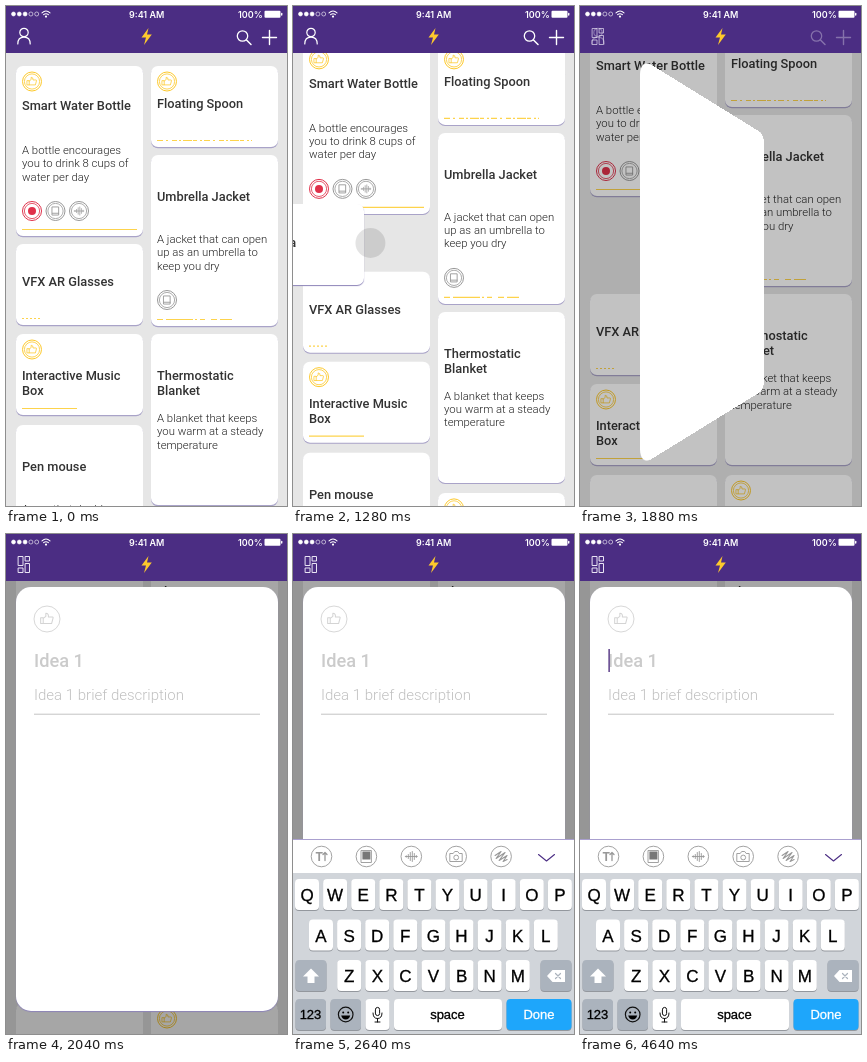
Animation of 281 by 500 pixels, one loop 4.96 s. Source, as an HTML page:

```html
<!DOCTYPE html>
<html lang="en">
<head>
<meta charset="utf-8">
<title>Idea board</title>
<style>
  html, body { margin: 0; width: 100%; height: 100%; overflow: hidden; background: #e6e6e6; }
  #stage { position: relative; width: 281px; height: 500px; overflow: hidden; }
  #stage > * { position: absolute; left: 0; top: 0; }
  svg { display: block; overflow: hidden; }
  text { font-family: Roboto, sans-serif; }
  .title { font-size: 12.8px; font-weight: 500; fill: #333; }
  .desc { font-size: 11.35px; font-weight: 300; fill: #222; }
  .status { font: 600 9px Inter, sans-serif; fill: #fff; }
  .key { font: 17px "Liberation Sans", Arial, sans-serif; fill: #000; stroke: #000; stroke-width: .3px; text-anchor: middle; }
  .small { font-size: 13px; }
  .done { fill: #fff; stroke: #fff; }
  .line { fill: none; stroke-linecap: round; stroke-linejoin: round; }
  #dim { top: 47px; width: 281px; height: 453px; background: #000; }
  #sheet { background: #fff; }
  #sheet svg { position: absolute; left: 0; }
  #front { top: 50%; margin-top: -40.5px; }
  #editor { top: 0; }
</style>
</head>
<body>
<div id="stage"></div>
<script>
const LOOP = 4960, STEP = 40;
const YELLOW = '#fdc92c', GRAY = '#989898', PURPLE = '#4b2d83';

// ---- drawing helpers ----
const svg = (id, w, h, body, extra = '') =>
  `<svg id="${id}" width="${w}" height="${h}" ${extra}>${body}</svg>`;
const at = (x, y, body, scale = 1) => `<g transform="translate(${x} ${y}) scale(${scale})">${body}</g>`;
const path = (d, color, width = 1) =>
  `<path class="line" d="${d}" stroke="${color}" stroke-width="${width}"/>`;
const ring = (r, color, width = 1) =>
  `<circle r="${r}" fill="none" stroke="${color}" stroke-width="${width}"/>`;
const rect = (x, y, w, h, r, fill) =>
  `<rect x="${x}" y="${y}" width="${w}" height="${h}" rx="${r}" fill="${fill}"/>`;
const text = (x, y, cls, words) => `<text x="${x}" y="${y}" class="${cls}">${words}</text>`;
const lines = (x, y, step, cls, rows) => rows.map((row, i) => text(x, y + i * step, cls, row)).join('');

const thumb = color => path('M-5.5-1h2.2v5h-2.2zM-3.3-.5L-1-2.3V-5Q1.6-5 1.2-1.8H4.8Q5.6-1.6 5.2-.5L4 4H-3.3', color, .9);
const book = path('M-3.5-4.5h7v9h-7zM-3.5 2.5h7', GRAY, 1);
const wave = path('M-5-.7V.7M-3-2V2M-1-4V4M1-5V5M3-3V3M5-1V1M-6 0H6', GRAY, .9);
const badge = (x, y, color, glyph) => at(x, y, ring(9.5, color) + ring(7.6, color, .8) + glyph);

const badges = {
  thumb: (x, y) => badge(x, y, YELLOW, at(0, 0, thumb(YELLOW), .85)),
  pin: (x, y) => badge(x, y, '#e0304a', '<circle r="4" fill="#e0304a"/>'),
  book: (x, y) => badge(x, y, GRAY, at(0, 0, book, .9)),
  wave: (x, y) => badge(x, y, GRAY, at(0, 0, wave, .8)),
};

function card(x, y, h, { title, titleY = 46, desc = [], icons = [], liked, bar, dash = '' }) {
  return at(x, y,
    rect(0, 1.2, 127, h, 7, '#a9a3c8') + rect(0, 0, 127, h, 7, '#fff') +
    (liked ? badges.thumb(16, 15.5) : '') +
    lines(6, titleY, 15, 'title', title) +
    lines(6, 88, 13.3, 'desc', desc) +
    icons.map((name, i) => badges[name](16 + i * 23.5, 145)).join('') +
    (bar ? `<path d="M6 ${h - 6.5}h${bar}" stroke="#fdd34c" stroke-width="1.2" stroke-dasharray="${dash}"/>` : ''));
}

// ---- board ----
const rising =
  card(10, 60, 170, { title: ['Smart Water Bottle'], titleY: 44, liked: true, bar: 115, icons: ['pin', 'book', 'wave'],
    desc: ['A bottle encourages', 'you to drink 8 cups of', 'water per day'] }) +
  card(145, 60, 81, { title: ['Floating Spoon'], titleY: 42, liked: true, bar: 95, dash: '6 3 2 4 5 2 2 2 9 1 4 3 2 2' }) +
  card(145, 149, 171, { title: ['Umbrella Jacket'], icons: ['book'], bar: 75, dash: '6 3 27 2 2 3 5 6',
    desc: ['A jacket that can open', 'up as an umbrella to', 'keep you dry'] }) +
  card(145, 328, 171, { title: ['Thermostatic', 'Blanket'],
    desc: ['A blanket that keeps', 'you warm at a steady', 'temperature'] }) +
  card(145, 509, 171, { title: [], liked: true });
const sinking =
  card(10, 238, 81, { title: ['VFX AR Glasses'], titleY: 42, bar: 18, dash: '2 2' }) +
  card(10, 328, 81, { title: ['Interactive Music', 'Box'], liked: true, bar: 55 }) +
  card(10, 419, 170, { title: ['Pen mouse'], desc: ['A pen that doubles'] });

// ---- header ----
const dots = [0, 1, 2, 3, 4].map(i =>
  `<circle cx="${7.5 + i * 5.8}" cy="8" r="2" fill="${i < 3 ? '#fff' : 'none'}" stroke="#fff" stroke-width=".6"/>`).join('');
const header =
  rect(0, 0, 281, 47, 0, PURPLE) + dots +
  path('M36 6.8Q40 3.2 44 6.8M37.6 8.7Q40 6.7 42.4 8.7', '#fff', 1.1) + '<circle cx="40" cy="10.6" r="1.1" fill="#fff"/>' +
  text(123, 11.5, 'status', '9:41 AM') + text(232, 11.5, 'status', '100%') +
  rect(258.5, 4.7, 16, 7, 1, '#fff') + rect(275, 6.8, 1.4, 3, .7, '#fff') +
  `<path d="M142.5 22L135.5 31.5H140L138 39L145.8 28.5H141Z" fill="${YELLOW}"/>` +
  '<g id="boardIcons">' +
    at(18, 26.5, ring(4.2, '#fff', 1.2)) + path('M11.8 38Q11.8 31.2 18 31.2T24.2 38', '#fff', 1.2) +
    at(236.5, 30, ring(5.2, '#fff', 1.3)) + path('M240.5 34L245 38.5', '#fff', 1.5) +
    path('M256.5 31.5h14M263.5 24.5v14', '#fff', 1.4) +
  '</g><g id="editIcons">' +
    path('M12.5 22.5h4.5v9h-4.5zM12.5 34h4.5v4.5h-4.5zM19.5 22.5h4v4.5h-4zM19.5 29.5h4v9h-4z', '#e9e4f4', 1) +
  '</g>';

// ---- editor sheet ----
const editor =
  at(31, 31, ring(13, '#d8d8d8') + at(0, 0, thumb('#d4d4d4'), 1.15)) +
  '<text x="18" y="79" font-size="18.2" font-weight="500" fill="#cbcbcb">Idea 1</text>' +
  '<text x="18" y="111.5" font-size="15" font-weight="300" fill="#c0c0c0">Idea 1 brief description</text>' +
  rect(18, 125.7, 226, 1, 0, '#c4c4c4') +
  '<rect id="cursor" x="18.3" y="61" width="1.7" height="23" fill="#6f5597"/>';

// ---- keyboard, with its tool bar on top ----
const keyBox = (x, y, w, fill = '#fff') => rect(x, y + 1, w, 31, 4, '#93979d') + rect(x, y, w, 31, 4, fill);
const keyRow = (letters, center, y) => [...letters].map((letter, i) => {
  const x = center + i * 28.1;
  return keyBox(x - 12, y, 24) + text(x, y + 22, 'key', letter);
}).join('');
const tools = [
  `<text x="-6" y="4.5" font-size="12" font-weight="700" fill="${GRAY}">T</text>` + path('M3.5 4V-4M1.5-2L3.5-4L5.5-2', GRAY, 1.3),
  path('M-5-6h10v12h-10z', GRAY, .9) + rect(-4, -5, 8, 8, 0, '#777'),
  wave,
  path('M-6-3h3l1.5-2h3L3-3h3v8h-12z', GRAY, .9) + at(0, 1, ring(2.4, GRAY, .9)),
  path('M-6-1L0-5L-5 2L4-4L-2 4L6-1L2 5L6 3', GRAY, 1.1),
];
const DARK_KEY = '#abb3bd';
const keys =
  keyRow('QWERTYUIOP', 14, 39) + keyRow('ASDFGHJKL', 28, 79.5) + keyRow('ZXCVBNM', 56.2, 120) +
  keyBox(2.5, 120, 31, DARK_KEY) + '<path d="M18 128.5L26 136.5H21.5V143H14.5V136.5H10Z" fill="#fff"/>' +
  keyBox(247.5, 120, 31, DARK_KEY) +
  '<path d="M254 136L259.5 130H272V142H259.5Z" fill="#fff"/>' + path('M262.5 133.5l5 5M267.5 133.5l-5 5', DARK_KEY, 1.2) +
  keyBox(2.5, 159, 30.5, DARK_KEY) + text(17.5, 179, 'key small', '123') +
  keyBox(37.5, 159, 30.5, DARK_KEY) +
  at(52.7, 174.5, ring(7.3, '#111', 1.2) + '<circle cx="-2.5" cy="-2" r="1"/><circle cx="2.5" cy="-2" r="1"/><path d="M-4.5 1h9Q3.5 5 0 5T-4.5 1Z"/>') +
  keyBox(72.5, 159, 24) +
  path('M82.4 169.5a2.1 2.1 0 0 1 4.2 0v4a2.1 2.1 0 0 1-4.2 0zM80 173Q80 178.5 84.5 178.5T89 173M84.5 178.5V182M82 182h5', '#111', 1) +
  keyBox(101, 159, 108) + text(154.5, 178.5, 'key small', 'space') +
  keyBox(213.5, 159, 65, '#1ea6fb') + text(246, 179, 'key small done', 'Done');
const keyboard =
  rect(0, 0, 281, 195, 0, '#d1d5da') + rect(0, 0, 281, 34, 0, '#fff') + rect(0, 0, 281, 1, 0, '#aaa0cf') +
  at(0, 1, tools.map((glyph, i) => at(28.5 + i * 44.9, 16.5, ring(10.3, GRAY, .9) + glyph)).join('') +
    path('M245.5 14.5L253.5 21L261.5 14.5', PURPLE, 1.1) + keys);

const touch = '<circle r="15" cy="237" fill="#000" fill-opacity=".11"/>';
document.getElementById('stage').innerHTML =
  svg('board', 281, 500, `<g id="rising">${rising}</g><g id="sinking">${sinking}</g>`) +
  '<div id="dim"></div>' +
  `<div id="sheet">${svg('front', 127, 81, text(6, 43, 'title', 'New Idea'))}` +
  svg('editor', '100%', '100%', editor, 'viewBox="0 -1 262 424" preserveAspectRatio="none"') + '</div>' +
  svg('overlay', 281, 500, `<g id="touch">${touch}</g>`) +
  svg('header', 281, 47, header) +
  svg('keyboard', 281, 195, keyboard);

// ---- motion ----
const el = id => document.getElementById(id);
const clamp = v => Math.min(1, Math.max(0, v));
const span = (t, from, to) => clamp((t - from) / (to - from));
const mix = (a, b, p) => a + (b - a) * p;
const inOut = u => u < .5 ? 2 * u * u : 1 - 2 * (1 - u) ** 2;
const smooth = u => u * u * (3 - 2 * u);
const out = (u, power) => 1 - (1 - u) ** power;

function placeSheet(slide, flip) {
  const w = mix(127, 262, flip), top = mix(198, 53, flip), bottom = mix(279, 477, flip);
  const center = mix(73.5, 141, out(flip, 2.4)) - 147 * (1 - slide);
  const angle = flip < .5 ? -180 * flip : 180 * (1 - flip);
  Object.assign(el('sheet').style, {
    left: center - w / 2 + 'px', top: top + 'px', width: w + 'px', height: bottom - top + 'px',
    borderRadius: mix(7, 15, flip) + 'px',
    boxShadow: angle ? 'none' : '0 1px 1px #8d84b8',
    transform: angle ? `perspective(400px) rotateY(${angle}deg)` : 'none',
    visibility: slide > 0 ? 'visible' : 'hidden',
  });
  el('front').style.opacity = flip < .5 ? 1 : 0;
  el('editor').style.opacity = span(flip, .72, 1);
}

function draw(t) {
  const slide = inOut(span(t, 990, 1540));
  const flip = smooth(span(t, 1616, 2040));
  el('rising').setAttribute('transform', `translate(0 ${-40 * slide})`);
  el('sinking').setAttribute('transform', `translate(0 ${50 * slide})`);
  placeSheet(slide, flip);

  el('touch').setAttribute('transform', `translate(${140 * slide})`);
  el('touch').style.opacity = span(t, 1000, 1080) * (1 - span(t, 1440, 1560));

  el('dim').style.opacity = .35 * flip;
  el('boardIcons').style.opacity = 1 - flip;
  el('editIcons').style.opacity = flip;

  const rise = out(span(t, 2210, 2640), 3);
  el('keyboard').style.top = mix(500, 305, rise) + 'px';

  const cursorOn = t >= 3080 && t < 3480 || t >= 3880 && t < 4280 || t >= 4640;
  el('cursor').style.opacity = cursorOn ? 1 : 0;
}

function tick() {
  draw(Math.floor(performance.now() % LOOP / STEP) * STEP);
  requestAnimationFrame(tick);
}
tick();
</script>
</body>
</html>
```
